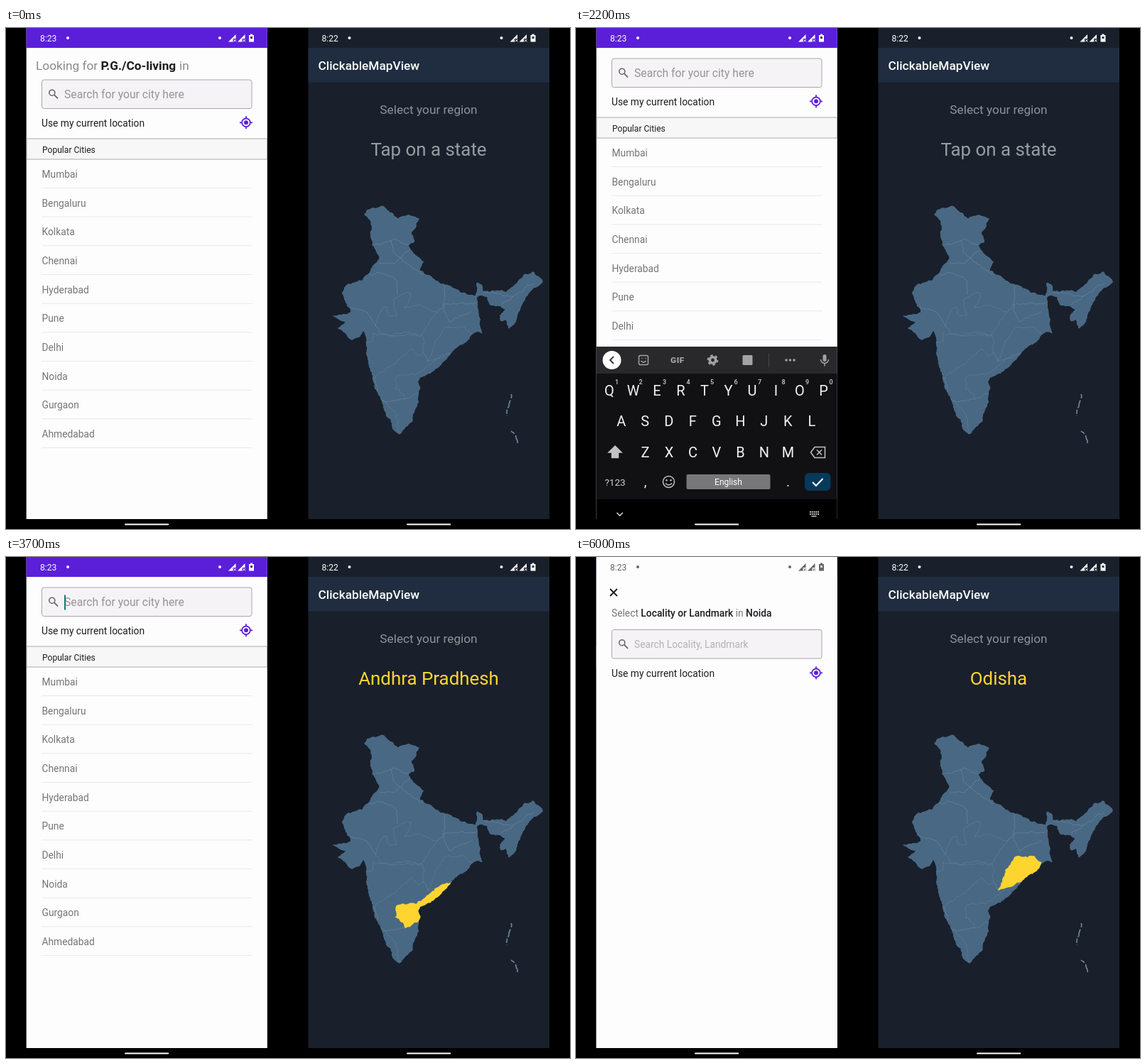
An HTML page for the animation above (6100 ms loop, 794 by 706 pixels).

```html
<!DOCTYPE html>
<html lang="en">
<head>
<meta charset="utf-8">
<title>City search and clickable map</title>
<style>
  html, body { margin: 0; width: 100%; height: 100%; overflow: hidden; background: #000; }
  svg { display: block; width: 100vw; height: 100vh; font-family: Roboto, sans-serif; }
  text { white-space: pre; }
</style>
</head>
<body>
<svg id="stage" viewBox="0 0 794 706"></svg>
<script>
const LOOP = 6100, STEP = 100;
const PURPLE = '#5c1fd9', GRAY = '#757575', INK = '#1c1b1e', YELLOW = '#fed530', TEAL = '#12806f', ICON = '#c2c1c4';
const LEFT = 28.4, RIGHT = 425.5, WIDTH = 339.5, HEIGHT = 692;
const CITIES = ['Mumbai', 'Bengaluru', 'Kolkata', 'Chennai', 'Hyderabad', 'Pune', 'Delhi', 'Noida', 'Gurgaon', 'Ahmedabad'];
const MATCHES = ['Mumbai', 'Mohali', 'Mysore'];

// Key points of the coast; roughPath adds the small bays between them.
const COUNTRY = `504 262 516 253 530 250 552 268 566 263 582 268 571 288 575 302 567 307 589 329 583 342 612 360 655 376
  661 377 662 359 669 361 671 371 704 372 729 347 742 343 756 358 740 370 725 394 713 420 708 424 704 411 696 413 695 405
  702 396 681 390 677 379 664 379 664 393 671 430 661 429 652 439 627 458 598 487 583 493 581 528 571 556 554 573
  547 568 529 527 516 494 507 458 503 427 497 436 487 440 467 423 479 414 460 405 485 400 473 373 482 360 502 355
  525 325 514 298 513 272`;
// Selected regions run past the coast and are clipped to the country.
const REGIONS = [
  { start: 2500, name: 'Kerala', shape: '524 520 535 528 545 539 552 553 553 572 540 575' },
  { start: 3500, name: 'Andhra Pradhesh', shape: '634 457 614 461 590 480 577 489 549 492 548 508 562 523 574 516 590 514 640 470' },
  { start: 4200, name: 'Maharashtra', shape: '517 430 540 434 574 430 585 432 588 458 580 462 572 452 548 474 524 487 519 494 500 494 500 446 517 441' },
  { start: 5200, name: 'Madhya Pradesh', shape: '520 420 528 398 536 393 538 404 550 406 545 384 556 376 570 374 561 394 583 390 608 400 584 434 566 431 546 434 527 431' },
  { start: 5800, name: 'Odisha', shape: '594 470 604 441 617 423 645 421 655 430 660 445 632 462 627 458 606 466' }
];
const BORDERS = [
  '519 306 545 297 566 305', '541 298 548 318 562 330 588 347', '525 331 547 332 569 311', '508 346 530 345 550 356 552 376',
  '484 393 508 400 520 420', '618 363 616 390 608 400', '616 390 663 386', '616 390 624 414 655 400',
  '588 458 594 470', '519 494 522 512', '530 525 562 523', '671 371 714 378 744 360', '714 378 698 390'
];
const ISLANDS = ['711 516 708 530 705 547', '711 568 716 573 720 585'];

// Drawing helpers
const text = (x, y, s, size, fill, extra = '') => `<text x="${x}" y="${y}" font-size="${size}" fill="${fill}" ${extra}>${s}</text>`;
const center = (x, y, s, size, fill, extra = '') => text(x, y, s, size, fill, 'text-anchor="middle" ' + extra);
const rect = (x, y, w, h, fill, extra = '') => `<rect x="${x}" y="${y}" width="${w}" height="${h}" fill="${fill}" ${extra}/>`;
const circle = (x, y, r, fill, extra = '') => `<circle cx="${x}" cy="${y}" r="${r}" fill="${fill}" ${extra}/>`;
const ring = (x, y, r, color, width = 1.6, extra = '') => circle(x, y, r, 'none', `stroke="${color}" stroke-width="${width}" ${extra}`);
const line = (d, color, width = 1.6, extra = '') => `<path d="M${d}" fill="none" stroke="${color}" stroke-width="${width}" ${extra}/>`;
const cross = (x, y, r, color, width) => line(`${x - r} ${y - r}l${2 * r} ${2 * r}m0 ${-2 * r}l${-2 * r} ${2 * r}`, color, width);
const group = (content, extra) => `<g ${extra}>${content}</g>`;
const ramp = (t, from, to) => 1 - (1 - Math.min(1, Math.max(0, (t - from) / (to - from)))) ** 2;

// Splits each segment at a displaced midpoint; the offset depends on the place, so shared edges agree.
const noise = (x, y) => {
  const v = Math.sin(x * 12.9898 + y * 78.233) * 43758.5453;
  return v - Math.floor(v) - .5;
};
function roughen([ax, ay], [bx, by]) {
  const length = Math.hypot(bx - ax, by - ay);
  if (length < 2.5) return `L${bx.toFixed(1)} ${by.toFixed(1)}`;
  const x = (ax + bx) / 2, y = (ay + by) / 2, reach = .32 * Math.min(length, 11);
  const middle = [x + reach * noise(x, y), y + reach * noise(y, x)];
  return roughen([ax, ay], middle) + roughen(middle, [bx, by]);
}
function roughPath(points, closed) {
  const n = points.trim().split(/\s+/).map(Number);
  const p = n.filter((_, i) => i % 2 === 0).map((x, i) => [x, n[2 * i + 1]]);
  if (closed) p.push(p[0]);
  return p[0].join(' ') + p.slice(1).map((end, i) => roughen(p[i], end)).join('');
}
const fillShape = (d, color) => `<path d="M${d}" fill="${color}"/>`;

const country = roughPath(COUNTRY, true);
const regionPaths = REGIONS.map(region => roughPath(region.shape, true));
const borderLines = BORDERS.map(b => line(roughPath(b), '#738c9c', .6)).join('') +
  regionPaths.map(d => line(d, '#6b8697', .5)).join('');
const islandLines = ISLANDS.map(d => line(roughPath(d), '#748a99', 1.6, 'stroke-dasharray="6 3 12 3"')).join('');
const DEFS = `<defs><clipPath id="leftScreen"><rect x="${LEFT}" width="${WIDTH}" height="706"/></clipPath>
  <clipPath id="country"><path d="M${country}"/></clipPath></defs>`;

function statusBar(x, time, color) {
  const signal = sx => fillShape(`${sx} 19.5l10.5-10.5v6h-4v4.5z`, color) + cross(sx + 9.2, 17.7, 1.7, color, 1);
  return text(x + 19, 18.5, time, 12.1, color) + circle(x + 58, 14, 2, color) + circle(x + 272, 14, 2, color) +
    signal(x + 284) + signal(x + 297) +
    fillShape(`${x + 313} 10h2v-1.5h3v1.5h2v9.5h-7z`, color) + rect(x + 315, 12, 3, 3, color === '#fff' ? '#333' : '#ddd');
}

const navHandle = x => rect(x, 698.5, 62.3, 2, '#fff', 'rx="1"');

function locationRow(y) {
  return text(50, y + 5.2, 'Use my current location', 13.81, INK) + ring(338, y, 5.8, PURPLE, 1.8) + circle(338, y, 3, PURPLE) +
    line(`338 ${y - 9}v3m0 12v3m-9-9h3m12 0h3`, PURPLE, 1.8);
}

function searchBox(y, hint, { size, hintColor, icon, cursor, query = '' }) {
  const x = icon ? 82 : 69, mid = y + 20.5;
  let s = rect(50.5, y, 295.5, 40.5, '#f5f3f6', 'rx="3" stroke="#a8a6a9"');
  if (icon) s += ring(64.8, mid - 2.3, 4, '#666') + line(`67.8 ${mid + .7}l5.2 5.2`, '#666', 1.8);
  if (query) {
    s += text(x, mid + 6, query, 16.5, PURPLE, 'text-decoration="underline"') + cross(324, mid, 5, '#666', 1.4);
  } else s += text(x, mid + 5.3, hint, size, hintColor);
  if (cursor) s += rect(x + (query ? 5 + 9 * query.length : 0), mid - 10, 2, 21, TEAL);
  return s;
}

function cityRows(names, y) {
  return names.map((name, i) => text(50.5, y + 5 + 40.67 * i, name, 13.81, GRAY) +
    rect(50, y + 19 + 40.67 * i, 297, 1, '#e9e8ea')).join('');
}

function cityScreen(t, query, cursor) {
  const rise = ramp(t, 0, 300);
  const title = text(42, 59, `Looking for <tspan x="133.5" font-weight="700" fill="${INK}">P.G./Co-living</tspan><tspan x="244">in</tspan>`, 17.26, '#8b898c', `opacity="${1 - rise}"`);
  const box = searchBox(73, 'Search for your city here', { size: 15.7, hintColor: '#969497', icon: true, cursor, query });
  const list = query ? cityRows(MATCHES, 138) :
    locationRow(133.3) + rect(29, 156, 338.5, 29, '#f8f7f8', 'stroke="#aaa"') +
    text(51, 176, 'Popular Cities', 12.08, INK) + cityRows(CITIES, 206);
  return rect(LEFT, 0, WIDTH, HEIGHT, '#fefdfe') + title + group(box + list, `transform="translate(0 ${-30 * rise})"`) +
    rect(LEFT, 0, WIDTH, 28, PURPLE) + statusBar(29, '8:23', '#fff');
}

function localityScreen(t, cursor) {
  const focused = t < 5800, scale = .9 + .1 * ramp(t, 5100, 5600);
  const strong = s => `<tspan fill="${INK}" font-weight="500">${s}</tspan>`;
  const page = cross(53, 50, 5, INK, 1.9) +
    text(50, 84, `Select ${strong('Locality or Landmark')} in ${strong('Noida')}`, 13.81, GRAY) +
    searchBox(102.5, 'Search Locality, Landmark', { size: 13.81, hintColor: '#b3b1b4', icon: !focused, cursor: focused && cursor }) +
    locationRow(163.3);
  return group(rect(LEFT, 0, WIDTH, HEIGHT, '#fefdfe') +
    group(page, `transform="translate(198 346) scale(${scale}) translate(-198 -346)"`) +
    statusBar(29, '8:23', '#666'), `opacity="${ramp(t, 5100, 5400)}"`);
}

function keyboardStrip(query) {
  const tint = '#a3a2a5', divider = x => rect(x, 458, 1, 20, '#434245');
  let s = rect(LEFT, 449, WIDTH, 38, '#29282b') + circle(50.5, 468, 13, '#fff') +
    line(query ? '48 463l5 5l-5 5' : '53 463l-5 5l5 5', '#333', 1.8) +
    rect(347.5, 460, 5, 10, tint, 'rx="2.5"') + line('344.5 467a5.5 5.5 0 0 0 11 0m-5.5 5.5v4', tint, 1.5);
  if (query) {
    return s + [query, 'My', 'More'].map((word, i) => center(104 + 93 * i, 474.5, word, 16, '#d6d5d8')).join('') +
      divider(148) + divider(246.5);
  }
  s += rect(88.5, 461.5, 13, 13, 'none', `rx="2" stroke="${tint}" stroke-width="1.5"`) + line('91.5 469q3.5 4 7 0m-6-3.500h1m4 0h1', tint, 1.5);
  s += center(143, 472.3, 'GIF', 11.8, tint, 'font-weight="900" letter-spacing=".6"');
  s += ring(192.5, 468, 4.2, tint, 3.6) + ring(192.5, 468, 6.6, tint, 2.4, 'stroke-dasharray="3.4 3.51"');
  s += rect(234.5, 461, 14, 14, tint, 'rx="1.5"') + divider(271);
  return s + [-1, 0, 1].map(i => circle(301.5 + 5.5 * i, 468, 1.8, tint)).join('');
}

function keyPopup({ label, x, y }) {
  return rect(x - 16.5, y, 33, 97, '#1c7a97', 'rx="3"') + center(x, y + 33, label, 23, '#fff') + center(x + 8, y + 43, '…', 9, '#fff');
}

function keyboard(query, upper, popup) {
  const white = '#f3f2f4';
  let s = rect(LEFT, 664, WIDTH, 42, '#000') + rect(LEFT, 487, WIDTH, 177, '#111013') + keyboardStrip(query);
  ['qwertyuiop', 'asdfghjkl', 'zxcvbnm'].forEach((keys, row) => {
    [...(upper ? keys.toUpperCase() : keys)].forEach((key, i) => {
      const x = 47 + 16.8 * row + 33.5 * i + (row === 2 ? 16.8 : 0) - (row === 2 ? 0 : 0);
      s += center(x, (upper ? 518 : 515.5) + 43.4 * row, key, 20, white);
      if (row === 0) s += center(x + 10.5, 502, (i + 1) % 10, 9, '#d2d1d4', 'font-weight="500"');
    });
  });
  s += `<path d="M55 589l9 9h-4.500v7.500h-9v-7.500h-4.500z" fill="${upper ? ICON : 'none'}" stroke="${ICON}" stroke-width="1.5"/>`;
  s += line('336 590.5h14.500v15h-14.500l-5.500-7.500z', ICON, 1.5) + cross(342.5, 598, 3.5, ICON, 1.5);
  s += center(55, 644.5, '?123', 13.5, '#d2d1d4') + center(97.5, 646, ',', 19, white) + center(298.5, 646, '.', 19, white);
  s += ring(130.5, 639.5, 8, ICON, 1.5) + circle(127.5, 637.3, 1.2, ICON) + circle(133.5, 637.3, 1.2, ICON) +
    line('126 641.5q4.500 5 9 0', ICON, 1.5);
  s += rect(155.5, 629, 118, 21, '#777679', 'rx="2"') + center(214.5, 644, 'English', 12, '#fff');
  s += rect(322, 627, 36.5, 25, '#063a5b', 'rx="6"') + line('333 640l5 5l9.500-10', '#fff', 2);
  s += line('57.5 683l4.200 4.200l4.200-4.200', '#ddd', 1.5);
  s += line('329 682h13m-13 3h13', '#ccc', 2, 'stroke-dasharray="1.8 1"') + line('331.5 688h7', '#ccc');
  return s + (popup ? keyPopup(popup) : '');
}

function leftPhone(t) {
  const locality = t >= 5200;
  const query = t < 1200 || t >= 2100 ? '' : t < 1600 ? 'M' : 'Ma';
  const typing = t >= 1100 && t < 1700;
  const cursor = typing || Math.floor(t / 500) % 2 === 1;
  const open = ramp(t, 0, 300) - ramp(t, 2800, 3100) + ramp(t, 5100, 5400) - ramp(t, 5700, 5950);
  const popup = t === 1100 ? { label: 'M', x: 298.5, y: 519 } : t === 1500 ? { label: 'a', x: 64.3, y: 474.5 } : null;
  let s = cityScreen(t, query, cursor);
  if (locality) s += localityScreen(t, cursor);
  s += rect(LEFT, HEIGHT, WIDTH, 14, '#000');
  if (open > 0) s += group(keyboard(query, !query && !locality, popup), `transform="translate(0 ${257 * (1 - open)})"`);
  return group(s, 'clip-path="url(#leftScreen)"') + navHandle(167);
}

function rightPhone(t) {
  const selected = REGIONS.findLastIndex(region => region.start <= t);
  const color = selected < 0 ? '#999da2' : YELLOW;
  let land = fillShape(country, '#496884') + borderLines;
  if (selected >= 0) land += fillShape(regionPaths[selected], YELLOW);
  return rect(RIGHT, 0, WIDTH, HEIGHT, '#19202b') + rect(RIGHT, 28, WIDTH, 48.5, '#202d40') + statusBar(RIGHT, '8:22', '#fff') +
    text(439.5, 59, 'ClickableMapView', 17.26, '#fff', 'font-weight="500"') +
    center(595, 121, 'Select your region', 17.26, '#8f9398') +
    center(595, 179.5, selected < 0 ? 'Tap on a state' : REGIONS[selected].name, 25.9, color) +
    group(land, 'clip-path="url(#country)"') + islandLines + navHandle(564);
}

const stage = document.getElementById('stage');
const start = performance.now();
let shown = -1;
function tick() {
  const t = Math.floor((performance.now() - start) % LOOP / STEP) * STEP;
  if (t !== shown) {
    shown = t;
    stage.innerHTML = DEFS + rect(0, 0, 794, 706, '#000') + leftPhone(t) + rightPhone(t);
  }
  requestAnimationFrame(tick);
}
tick();
</script>
</body>
</html>
```
